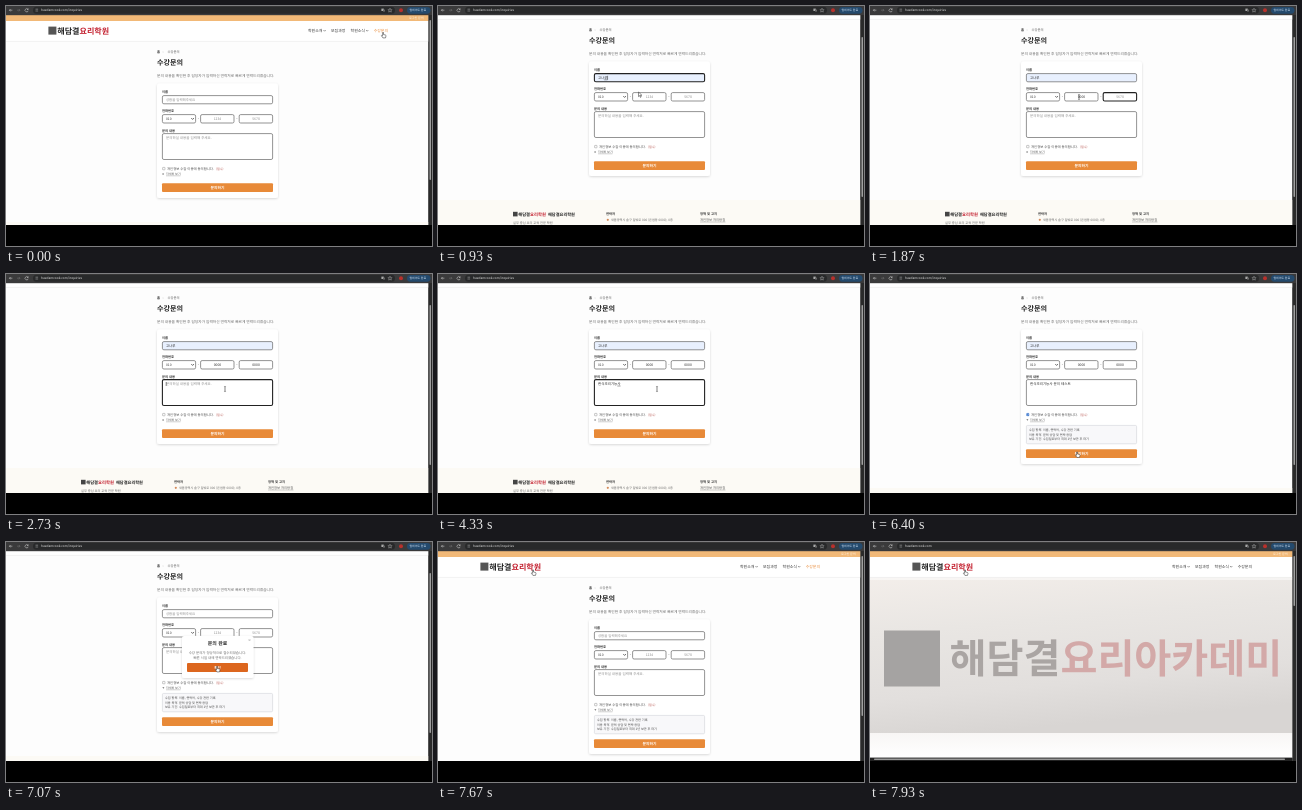
Animation of 426x240 px, one loop 8 s. Source, as an HTML page:

```html
<!DOCTYPE html>
<html lang="ko">
<head>
<meta charset="utf-8">
<title>수강문의</title>
<style>
html, body { margin: 0; width: 100%; height: 100%; overflow: hidden; background: #000; }
svg { display: block; width: 100vw; height: 100vh; }
text {
  font-family: "Noto Sans CJK KR", "Noto Sans CJK JP", "Noto Sans CJK", sans-serif;
  text-rendering: geometricPrecision;
  white-space: pre;
}
</style>
</head>
<body>
<svg id="stage" viewBox="0 0 426 240">
  <defs>
    <clipPath id="view"><rect y="9" width="422.5" height="210"/></clipPath>
    <linearGradient id="wall" x1="0" y1="0" x2="0.25" y2="1">
      <stop offset="0" stop-color="#f3eeea"/>
      <stop offset="0.35" stop-color="#e9e6e3"/>
      <stop offset="0.75" stop-color="#e2dfdd"/>
      <stop offset="1" stop-color="#d8d5d3"/>
    </linearGradient>
    <linearGradient id="below" x1="0" y1="0" x2="0" y2="1">
      <stop offset="0" stop-color="#f8f6f5"/>
      <stop offset="1" stop-color="#ffffff"/>
    </linearGradient>
    <filter id="shadow" x="-20%" y="-20%" width="140%" height="150%">
      <feDropShadow dx="0" dy="0.8" stdDeviation="1.2" flood-opacity="0.16"/>
    </filter>
  </defs>
</svg>
<script>
const LOOP = 8000, SCROLL = 22, EXPAND = 20;
const INK = '#333', HINT = '#8d8d8d', ORANGE = '#e88a38', RED = '#c3202f';
const stage = document.getElementById('stage');

function add(parent, tag, attrs = {}) {
  const el = document.createElementNS('http://www.w3.org/2000/svg', tag);
  for (const key in attrs) el.setAttribute(key, attrs[key]);
  parent.append(el);
  return el;
}
const group = (parent, attrs) => add(parent, 'g', attrs);
const rect = (parent, x, y, width, height, fill, more) =>
  add(parent, 'rect', { x, y, width, height, fill, ...more });
const line = (parent, d, stroke, width = 0.5) =>
  add(parent, 'path', { d, stroke, 'stroke-width': width, fill: 'none' });
// y is the middle of the line of text
function label(parent, x, y, string, size, fill = INK, more = {}) {
  const el = add(parent, 'text', { x, y: y + size * 0.37, 'font-size': size, fill, ...more });
  el.textContent = string;
  return el;
}
const BOLD = { 'font-weight': 700 }, MID = { 'text-anchor': 'middle' };
const show = (el, on) => el.setAttribute('visibility', on ? 'inherit' : 'hidden');
const move = (el, x, y) => el.setAttribute('transform', `translate(${x} ${y})`);
const setText = (el, string) => { if (el.textContent !== string) el.textContent = string; };

function wordmark(parent, x, y, size, tail = '요리학원', colors = ['#222', RED], weight = 900) {
  const el = label(parent, x, y, '', size, colors[0], { 'font-weight': weight });
  add(el, 'tspan').textContent = '해담결';
  add(el, 'tspan', { fill: colors[1] }).textContent = tail;
}

const view = group(stage, { 'clip-path': 'url(#view)' });
rect(view, 0, 9, 426, 210, '#fdfdfd');
const page = group(view);

// Inquiry form
const form = group(page);
label(form, 151, 46, '홈', 3.3, INK, BOLD);
label(form, 156.5, 46, '›', 3.3, HINT);
label(form, 161.5, 46, '수강문의', 3.3, '#555');
label(form, 151, 56.2, '수강문의', 7.1, '#222', BOLD);
label(form, 151, 69.3, '문의 내용을 확인한 후 담당자가 입력하신 연락처로 빠르게 연락드리겠습니다.', 3.68, '#666');
const panel = rect(form, 151, 77.5, 121, 114.5, '#fff', { rx: 2.5, filter: 'url(#shadow)' });

const field = (x, y, w, h) =>
  rect(form, x, y, w, h, '#fff', { rx: 1.5, stroke: '#666', 'stroke-width': 0.7 });
const caption = (y, string) => label(form, 156, y, string, 3.3, INK, BOLD);

caption(86, '이름');
const nameBox = field(156.4, 89.6, 110.2, 8.2);
const nameText = label(form, 160, 93.8, '', 3.4);
caption(105, '전화번호');
field(156.4, 108.6, 33.2, 8.4);
label(form, 160, 112.8, '010', 3.3, INK);
line(form, 'M185.3 112.1l1.3 1.3 1.3-1.3', '#222', 0.7);
const phones = [194.6, 233.2].map(x => {
  label(form, x - 2.3, 112.8, '-', 3.6, INK, MID);
  return { box: field(x, 108.6, 33.4, 8.4), text: label(form, x + 16.8, 112.8, '', 3.4, HINT, MID) };
});
caption(124.3, '문의 내용');
const memoBox = field(156.4, 127.6, 110.2, 25.9);
const memoText = label(form, 160, 132, '', 3.5);
const caret = line(form, 'M0-2v4', '#111', 0.5);
const underline = line(form, 'M0 0h3.2', '#111', 0.4);

const checkbox = rect(form, 156.6, 161.4, 2.4, 2.4, '#fff', { rx: 0.4, stroke: '#777', 'stroke-width': 0.4 });
const tick = line(form, 'M157.1 162.6l0.6 0.6 1-1.2', '#fff', 0.5);
label(form, 161, 162.5, '개인정보 수집·이용에 동의합니다.', 3.35, '#444');
label(form, 210, 162.5, '(필수)', 3, '#b5524c');
const arrow = add(form, 'path', { d: 'M156.6 167l1.6 1-1.6 1z', fill: '#666' });
label(form, 160, 168, '자세히 보기', 3, '#555');
line(form, 'M160 169.8h14.4', '#777', 0.35);

const details = group(form);
rect(details, 156.4, 173.4, 110.2, 18.4, '#f8f8fa', { rx: 1.2, stroke: '#c9cbd0', 'stroke-width': 0.5 });
['수집 항목: 이름, 연락처, 수강 관련 기록', '이용 목적: 문의 상담 및 연락 응답',
  '보유 기간: 수집일로부터 최대 1년 보관 후 파기']
  .forEach((string, i) => label(details, 159, 178.1 + i * 4.5, string, 3.1, '#444'));

const submit = group(form);
rect(submit, 156, 177.2, 111, 8.8, ORANGE, { rx: 1 });
label(submit, 211.5, 181.6, '문의하기', 3.8, '#fff', { ...BOLD, ...MID });

const footer = group(form);
rect(footer, 0, 216, 426, 60, '#fcfaf5');
rect(footer, 75, 227.8, 4.6, 4.6, '#444');
wordmark(footer, 80.2, 230, 4.3);
label(footer, 110, 230, '해담결요리학원', 4.2, '#222', BOLD);
label(footer, 75, 238.8, '실무 중심 요리 교육 전문 학원', 3.2, '#666');
label(footer, 168, 229.4, '연락처', 3.3, INK, BOLD);
add(footer, 'circle', { cx: 169.8, cy: 235.8, r: 1.1, fill: '#d58a5a' });
label(footer, 173, 236, '새봄광역시 솔구 달빛로 000 (온샘동 0000), 0층', 3.1, '#666');
label(footer, 262, 229.4, '정책 및 고지', 3.3, INK, BOLD);
label(footer, 262, 236, '개인정보 처리방침', 3.3, '#555');
line(footer, 'M262 238h25.5', '#777', 0.35);

// Home page
const home = group(page);
rect(home, 0, 35, 426, 156, 'url(#wall)');
rect(home, 0, 35, 426, 3, '#fff', { opacity: 0.5 });
rect(home, 14, 88.5, 56, 56, '#a5a3a2');
wordmark(home, 79.5, 116.5, 40.2, '요리아카데미', ['#aaa5a3', '#d3a9a8'], 700);
rect(home, 0, 191, 426, 25, 'url(#below)');
rect(home, 0, 215.6, 426, 4, '#222');
rect(home, 4, 216.6, 411, 1.3, '#999', { rx: 0.6 });

// Site header, shared by both pages
rect(page, 0, 9, 426, 6, '#f2b978');
label(page, 403, 12.2, '로그인 문의', 3, '#fff6e8');
rect(page, 0, 15, 426, 20.3, '#fff');
line(page, 'M0 35.4h426', '#e2e2e2', 0.5);
rect(page, 42.4, 20.6, 8, 8, '#555');
wordmark(page, 51.3, 24.6, 8.05);
const [, , , current] = [[302, '학원소개'], [325, '모집과정'], [344.6, '학원소식'], [367.7, '수강문의']]
  .map(([x, string], i) => {
    if (i % 2 === 0) line(page, `M${x + 15.6} 24.2l1 1 1-1`, INK, 0.6);
    return label(page, x, 24.8, string, 3.9);
  });

// Confirmation dialog
const dialog = group(view);
rect(dialog, 176, 94, 71.5, 42, '#fff', { rx: 2, filter: 'url(#shadow)' });
label(dialog, 211.5, 101.6, '문의 완료', 4.9, '#222', { ...BOLD, ...MID });
label(dialog, 211.5, 111, '수강 문의가 정상적으로 접수되었습니다.', 3.45, '#666', MID);
label(dialog, 211.5, 115.5, '빠른 시일 내에 연락드리겠습니다.', 3.45, '#666', MID);
line(dialog, 'M242.6 97.2l1.8 1.8m0-1.8l-1.8 1.8', '#888', 0.4);
const confirm = rect(dialog, 181, 121, 61, 9, ORANGE, { rx: 1 });
label(dialog, 211.5, 125.5, '확인', 3.6, '#fff', { ...BOLD, ...MID });

// Browser window
rect(stage, 0, 0, 426, 9.2, '#3a3a3b');
rect(stage, 27, 0.8, 362, 7, '#28292a', { rx: 3.5 });
line(stage, 'M6.4 4.2h-3m1.2-1.2l-1.2 1.2 1.2 1.2', '#ddd');
line(stage, 'M11 4.2h3m-1.2-1.2l1.2 1.2-1.2 1.2', '#777');
line(stage, 'M22 3.4a1.6 1.6 0 1 0 .2 1.4M22.2 2.4v1.2h-1.2', '#ddd');
line(stage, 'M29.5 3.2h2.6m-2.6 1.8h2.6', '#bbb');
const url = label(stage, 35, 4.2, '', 3.2, '#e4e4e4');
rect(stage, 375.4, 2.6, 2.4, 2.4, '#aaa');
rect(stage, 377, 3.6, 2, 2, '#666');
line(stage, 'M384 2.2l.6 1.4 1.4.1-1 1 .3 1.4-1.3-.7-1.3.7.3-1.4-1-1 1.4-.1z', '#ccc', 0.4);
add(stage, 'circle', { cx: 395, cy: 4.3, r: 2, fill: '#b8312c' });
rect(stage, 401, 0.9, 23.5, 6.8, '#244a6d', { rx: 3.4 });
label(stage, 403.4, 4.2, '업데이트 완료', 2.9, '#dcecff');
rect(stage, 422.5, 9, 3.5, 210, '#2a2a2a');
const thumb = rect(stage, 423.5, 14, 1.5, 160, '#a0a0a0', { rx: 0.7 });

// Pointers, each drawn around its hot spot
const pointers = {
  arrow: 'M0 0v4.6l1.1-1 .8 1.8.8-.4-.8-1.7h1.5z',
  hand: 'M-.4 0q.5-.5.9 0v2l2 .5q.6.3.5.9l-.5 2h-2.6l-1.5-2.2q.1-.6.7-.3l.5.4z',
  beam: 'M-.9-2.2h.7v4.4h-.7v.4h1.8v-.4h-.7v-4.4h.7v-.4h-1.8z'
};
const pointer = add(stage, 'path', { stroke: '#222', 'stroke-width': 0.5 });

// time, x, y, shape from this time on
const path = [
  [0, 377, 26.5, 'hand'], [380, 377, 26.5, 'arrow'], [600, 184, 72, 'beam'],
  [760, 184, 72, 'arrow'], [930, 200.5, 86, 'arrow'], [1130, 209, 91, 'beam'],
  [2330, 209, 91, 'beam'], [2600, 219, 115, 'beam'], [5200, 219, 115, 'arrow'],
  [5400, 157.8, 140, 'hand'], [5600, 157.8, 140, 'hand'], [5750, 158.5, 146.5, 'hand'],
  [6100, 158.5, 146.5, 'arrow'], [6380, 207, 178, 'hand'], [6620, 207, 178, 'arrow'],
  [6900, 211, 124.5, 'hand'], [7220, 211, 124.5, 'arrow'], [7640, 95, 28, 'hand'], [LOOP, 95, 28, 'hand']
];

const clamp = v => Math.min(1, Math.max(0, v));
const ease = v => v * v * (3 - 2 * v);
const ramp = (t, from, to) => ease(clamp((t - from) / (to - from)));
const within = (t, from, to) => t >= from && t < to;

const LEADS = 'ㄱㄲㄴㄷㄸㄹㅁㅂㅃㅅㅆㅇㅈㅉㅊㅋㅌㅍㅎ';
// Builds the last syllable up from consonant to vowel to full block.
function typed(string, amount) {
  const count = Math.floor(amount), part = amount - count;
  let out = string.slice(0, count);
  if (count < string.length && part > 0) {
    const code = string.charCodeAt(count) - 0xac00;
    if (code < 0) return out;
    out += part < 0.33 ? LEADS[Math.floor(code / 588)]
      : part < 0.66 ? String.fromCharCode(0xac00 + code - code % 28) : string[count];
  }
  return out;
}

function fill(el, value, hint) {
  setText(el, value || hint);
  el.setAttribute('fill', value ? '#222' : HINT);
}
function focus(box, on) {
  box.setAttribute('stroke', on ? '#222' : '#666');
  box.setAttribute('stroke-width', on ? 1.1 : 0.7);
}

function render(t) {
  const atHome = t >= 7860, sent = t >= 6520, open = within(t, 5900, 7860);
  const scrolled = ramp(t, 90, 340) - ramp(t, 7260, 7500);
  move(page, 0, -SCROLL * scrolled);
  show(form, !atHome);
  show(home, atHome);
  home.setAttribute('opacity', t < 7925 ? 0.7 : 1);
  setText(url, atHome ? 'haedamcook.com' : 'haedamcook.com/inquiries');
  current.setAttribute('fill', atHome ? INK : ORANGE);
  thumb.setAttribute('y', 14 + 17 * scrolled);
  thumb.setAttribute('height', atHome ? 50 : 160);

  const name = sent ? '' : typed('고나루', 3 * clamp((t - 630) / 270));
  fill(nameText, name, '성함을 입력해주세요');
  nameBox.setAttribute('fill', name ? '#e8f0fe' : '#fff');
  focus(nameBox, within(t, 600, 1180));

  phones.forEach(({ box, text }, i) => {
    const start = 1250 + i * 560;
    const digits = sent ? 0 : Math.floor(4 * clamp((t - start) / 440));
    fill(text, '0'.repeat(digits), ['1234', '5678'][i]);
    focus(box, within(t, start - 70, i ? 2620 : start + 490));
  });

  const writing = within(t, 2620, 5400);
  const memo = sent ? '' : typed('한식조리기능사 문의 테스트',
    7 * clamp((t - 2850) / 1450) + 7 * clamp((t - 4400) / 750));
  fill(memoText, memo, '문의하실 내용을 입력해 주세요.');
  focus(memoBox, writing);

  const naming = within(t, 600, 1180);
  const active = naming ? nameText : memoText;
  const value = naming ? name : memo;
  const end = 160 + (value ? active.getComputedTextLength() : 0);
  move(caret, end + 0.2, naming ? 93.8 : 132);
  move(underline, end - 3.2, naming ? 95.8 : 134);
  show(caret, (naming || writing) && (t - 2620 + 5300) % 1060 < 530);
  show(underline, value !== '' && (naming || within(t, 2850, 5200)));

  const agreed = within(t, 5470, 6520);
  checkbox.setAttribute('fill', agreed ? '#2868c8' : '#fff');
  checkbox.setAttribute('stroke', agreed ? '#2868c8' : '#777');
  show(tick, agreed);

  show(details, open);
  arrow.setAttribute('transform', `rotate(${open ? 90 : 0} 157.4 168)`);
  panel.setAttribute('height', 114.5 + (open ? EXPAND : 0));
  move(submit, 0, open ? EXPAND : 0);
  move(footer, 0, open ? EXPAND : 0);
  show(dialog, within(t, 6560, 7180));
  confirm.setAttribute('fill', t > 6900 ? '#dc661e' : ORANGE);

  const i = path.findLastIndex(stop => stop[0] <= t);
  const [t0, x0, y0, shape] = path[i];
  const [t1, x1, y1] = path[i + 1];
  const k = ramp(t, t0, t1);
  pointer.setAttribute('d', pointers[shape]);
  pointer.setAttribute('fill', shape === 'beam' ? '#222' : '#fff');
  pointer.setAttribute('stroke-width', shape === 'beam' ? 0.1 : 0.5);
  move(pointer, x0 + (x1 - x0) * k, y0 + (y1 - y0) * k);
}

const start = performance.now();
function tickFrame() {
  render((performance.now() - start) % LOOP);
  requestAnimationFrame(tickFrame);
}
tickFrame();
</script>
</body>
</html>
```
